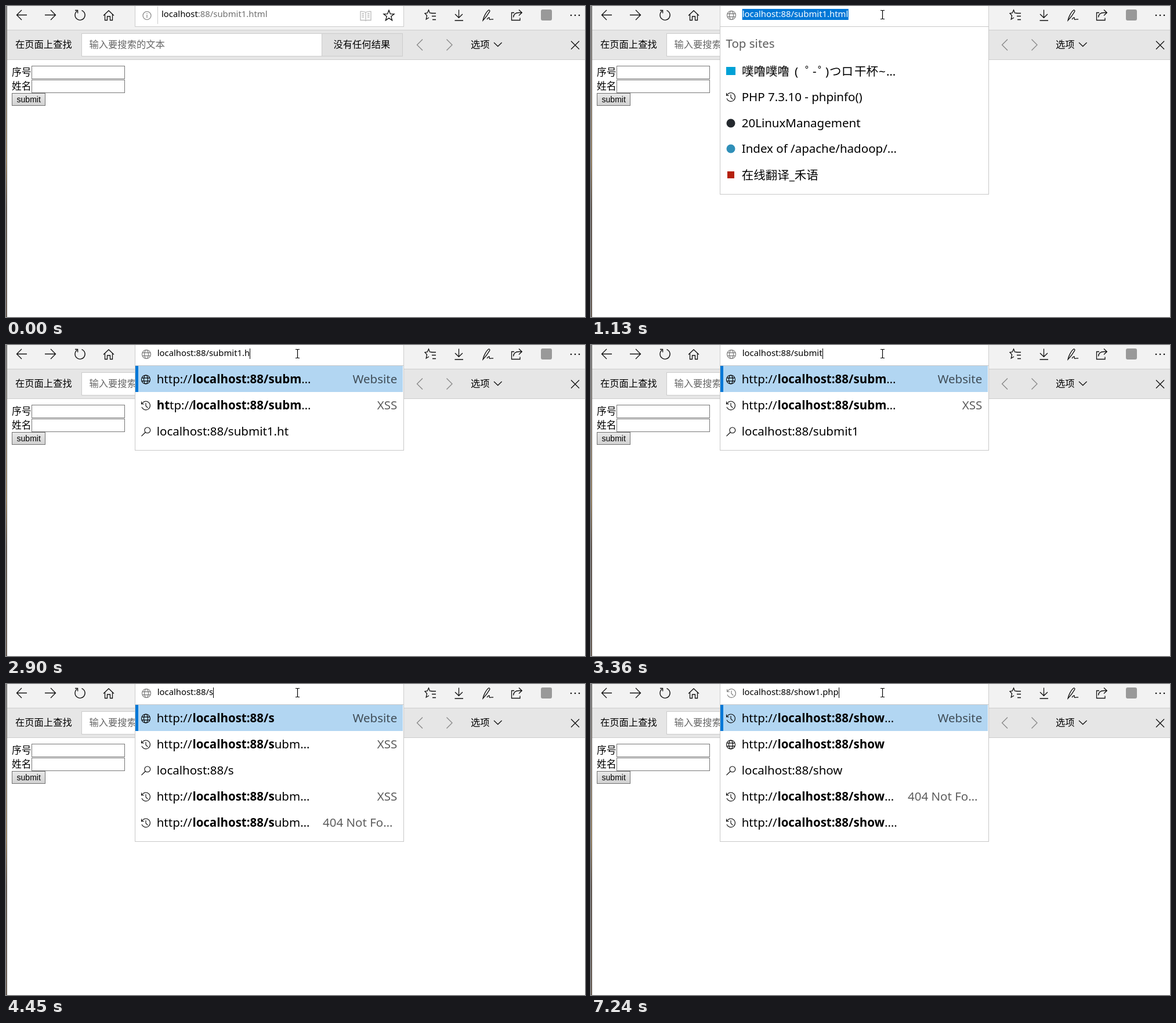
Write an HTML page that moves like this. It is 998 px wide and 536 px high and loops after 8 s.

```html
<!DOCTYPE html>
<html lang="zh-CN">
<head>
<meta charset="utf-8">
<title>Address bar</title>
<style>
html, body { margin: 0; width: 100%; height: 100%; overflow: hidden; background: #fff; }
svg { display: block; }
text { font: 16.3px "Noto Sans", "Noto Sans CJK SC", "Noto Sans CJK JP", sans-serif; white-space: pre; }
.url { font-size: 14.87px; }
.row { font-size: 20.5px; }
.bold { font-weight: 700; }
.page { font-size: 16.8px; }
.button { font: 14px "Liberation Sans", Arial, sans-serif; }
.line { fill: none; stroke: currentColor; stroke-width: 1.3; }
.thin { stroke-width: 1.1; }
</style>
</head>
<body>
<svg width="998" height="536" viewBox="0 0 998 536">
  <defs>
    <linearGradient id="edge" x1="0" y1="0" x2="0" y2="1">
      <stop offset="0" stop-color="#8a8a8a"/><stop offset=".25" stop-color="#a89a8c"/>
      <stop offset=".5" stop-color="#c09a62"/><stop offset=".65" stop-color="#5d4a3e"/>
      <stop offset="1" stop-color="#6f5a48"/>
    </linearGradient>
    <linearGradient id="face" x1="0" y1="0" x2="0" y2="1">
      <stop offset="0" stop-color="#e8e8e8"/><stop offset="1" stop-color="#d2d2d2"/>
    </linearGradient>
    <g id="globe" class="line thin">
      <circle r="7.5"/><ellipse rx="3.4" ry="7.5"/><path d="M-7 -2.6H7M-7 2.6H7"/>
    </g>
    <g id="clock" class="line thin">
      <path d="M-6.6 -3.4A7.4 7.4 0 1 1 -7 2.4M-7.4 -7V-2.8H-3.2M0 -4.6V.5L3.4 3.8"/>
    </g>
    <g id="search" class="line thin"><circle cx="2.8" cy="-2.6" r="4.9"/><path d="M-.8 1L-7.5 7.6"/></g>
    <path id="arrow" d="M.5 .5V16.5L4.2 13 6.7 18.5 9 17.5 6.6 12H11.6Z" fill="#fff" stroke="#000"/>
    <path id="beam" d="M-3.5 -7.5H-1L0 -6.5 1 -7.5H3.5M0 -6.5V6.5M-3.5 7.5H-1L0 6.5 1 7.5H3.5" fill="none" stroke="#000" stroke-width="1.2"/>
    <path id="star" d="M0 -9.2L2.4 -2.8 9 -2.6 3.8 1.6 5.6 8.2 0 4.4 -5.6 8.2 -3.8 1.6 -9 -2.6 -2.4 -2.8Z" class="line"/>
  </defs>

  <rect width="998" height="41" fill="#f2f2f2"/>
  <rect y="41" width="998" height="52" fill="#ccc"/>
  <rect y="42" width="998" height="50" fill="#e6e6e6"/>

  <g class="line" color="#111">
    <path d="M36 15.5H18.5M27 7L18.5 15.5 27 24"/>
    <path d="M67 15.5H85.5M77 7L85.5 15.5 77 24"/>
    <path d="M122.4 8.8A8.6 8.6 0 1 0 130.5 7.6M119 7.5H123.6V12.5"/>
    <path d="M168 16.5L177 8 186 16.5M170.5 14.5V24.5H174.5V18H179.5V24.5H183.5V14.5"/>
    <path d="M780.5 6.5V20M774 14L780.5 20.3 787 14M773.5 25H788"/>
    <path d="M822 25C823 19 828 10 831.5 7.2 833 6.4 834.6 8 833.6 9.6 830.5 15 826 21 822 25ZM829 23C832 19 834 19 833 22 833 25 836 22 840 23"/>
    <path d="M876 11.5H871.5V24.5H886V20.5M874.5 19.5C875 14 879 11.5 884 11.5H889M884 6.5L889.3 11.5 884 16.5"/>
    <path d="M974 74.5L988 60.5M974 60.5L988 74.5"/>
    <path d="M841 63L847.8 69.5 854.6 63"/>
    <path d="M733 12.5H741M734 17.5H741M735 23.5H741M735 12.5L730.5 12 728.5 7 726.3 12 722 12.6 725.5 16.5 724.2 23 729 20"/>
  </g>
  <g class="line" color="#888"><path d="M718 57.5L708.5 67 718 76.5M759.5 57.5L769 67 759.5 76.5"/></g>
  <rect x="922" y="6" width="19" height="19" rx="3" fill="#999"/>
  <g fill="#111"><circle cx="974" cy="16" r="1.3"/><circle cx="981" cy="16" r="1.3"/><circle cx="988" cy="16" r="1.3"/></g>

  <rect x="130.5" y="47.5" width="414" height="39" fill="#fff" stroke="#ccc"/>
  <rect x="544.5" y="47.5" width="139" height="39" fill="#e1e1e1" stroke="#ccc"/>
  <text x="16" y="72">在页面上查找</text>
  <text x="143.5" y="72" fill="#666">输入要搜索的文本</text>
  <text x="564.5" y="72">没有任何结果</text>
  <text x="801" y="71.5">选项</text>

  <text class="page" x="10" y="119.5">序号</text>
  <text class="page" x="10" y="143.5">姓名</text>
  <rect x="44.5" y="103.5" width="160" height="22" fill="#fff" stroke="#767676"/>
  <rect x="44.5" y="127.5" width="160" height="22" fill="#fff" stroke="#767676"/>
  <rect x="10.5" y="150.5" width="57" height="21" fill="url(#face)" stroke="#707070"/>
  <text class="button" x="39.2" y="166" text-anchor="middle">submit</text>

  <rect width="1" height="536" fill="url(#edge)"/>
  <rect x="1" width="1" height="536" fill="#686868"/>

  <g id="bar"></g>
  <g id="pointer"></g>
</svg>
<script>
const LOOP = 8000, HOST = 'localhost:88/', PAGE = 'submit1.html';
const LEFT = 259.7;
const bar = document.getElementById('bar'), pointer = document.getElementById('pointer');
const pen = document.createElement('canvas').getContext('2d');

// [start, path, selected characters at the end, view, caret hidden]
// view: idle, focus, top, or the query the suggestions belong to
const steps = [
  [0, PAGE, 0, 'idle'],
  [980, PAGE, 25, 'focus'],
  [1060, PAGE, 25, 'top'],
  [1210, PAGE, 0, 'top'],
  [2210, 'submit1.htm', 0, 'top'],
  [2290, 'submit1.htm', 0, 'submit1.htm'],
  [2590, 'submit1.ht', 0, 'submit1.htm'],
  [2670, 'submit1.ht', 0, 'submit1.ht'],
  [2900, 'submit1.h', 0, 'submit1.ht'],
  [2980, 'submit1.h', 0, 'submit1.h'],
  [3210, 'submit1.', 0, 'submit1.h'],
  [3290, 'submit1', 0, 'submit1.'],
  [3360, 'submit', 0, 'submit1'],
  [3440, 'submit', 0, 'submit'],
  [3590, 'submi', 0, 'submit'],
  [3660, 'submi', 0, 'submi'],
  [3740, 'subm', 0, 'submi'],
  [3810, 'subm', 0, 'subm'],
  [3890, 'sub', 0, 'subm'],
  [3970, 'sub', 0, 'sub'],
  [4120, 'su', 0, 'sub'],
  [4210, 'su', 0, 'su'],
  [4360, 's', 0, 'su'],
  [4450, 's', 0, 's'],
  [5140, 'sh', 0, 's'],
  [5230, 'show1.php', 7, 'sh'],
  [5380, 'show1.php', 6, 'sh'],
  [5460, 'show1.php', 6, 'sho'],
  [5610, 'show1.php', 5, 'sho'],
  [5690, 'show1.php', 5, 'show'],
  [7160, 'show1.php', 0, 'show', true],
  [7240, 'show1.php', 0, 'show']
];

// Pointer stops, one every 76 ms from 70 ms on
const path = [[882, 508], [868, 452], [820, 360], [745, 262], [662, 180], [590, 120],
  [530, 76], [488, 46], [471, 28], [486, 18], [503, 15]];

const use = (id, x, y, color = '#000') => `<use href="#${id}" x="${x}" y="${y}" color="${color}"/>`;
const text = (x, y, body, cls = 'row', more = '') => `<text class="${cls}" x="${x}" y="${y}" ${more}>${body}</text>`;
const box = (x, y, w, h, more) => `<rect x="${x}" y="${y}" width="${w}" height="${h}" ${more}/>`;
const bold = s => `<tspan class="bold">${s}</tspan>`;

function urlWidth(s) {
  pen.font = '14.87px "Noto Sans", sans-serif';
  return pen.measureText(s).width;
}

function label(s, y) {
  const short = s.endsWith('…');
  return text(short ? 546 : 674.3, y, s, 'row', `opacity=".64" text-anchor="${short ? 'start' : 'end'}"`);
}

function link(icon, strong, rest = '', note = '', hit = '') {
  return (y) => use(icon, 241, y + 1)
    + text(LEFT, y + 7.5, bold(hit) + 'http://'.slice(hit.length))
    + text(321.4, y + 7.5, bold(HOST + strong) + rest)
    + (note && label(note, y + 7.5));
}

function suggestions(q) {
  const stem = q.slice(0, 4);
  const find = y => use('search', 241, y + 1) + text(LEFT, y + 7.5, HOST + q);
  if (q.startsWith('sh')) {
    const rest = 'show'.slice(stem.length);
    return [link('clock', stem, rest + '…', 'Website'), link('globe', stem), find,
      link('clock', stem, rest + '…', '404 Not Fo…'), link('clock', stem, rest + '.…')];
  }
  const rest = 'subm'.slice(stem.length) + '…';
  const hit = (q.match(/\.(ht?)$/) || ['', ''])[1];
  const rows = [link('globe', stem, q.length > 4 ? '…' : '', 'Website'),
    link('clock', stem, rest, 'XSS', hit), find];
  if (q.length < 7) rows.push(link('clock', stem, rest, 'XSS'), link('clock', stem, rest, '404 Not Fo…'));
  return rows;
}

function panel(bottom) {
  return box(222.5, 35.5, 463, bottom - 35.5, 'fill="#fff" stroke="#c8c8c8"');
}

function topSites() {
  const cheer = [[260, '噗噜噗噜'], [351, '('], [369, '゜'], [382, '-'], [391, '゜'], [404, ')'],
    [411, 'つロ'], [454, '干杯'], [496, '~'], [509, '…']];
  const dot = (y, c) => `<circle cx="241" cy="${y}" r="7.5" fill="${c}"/>`;
  return panel(324.5) + text(232.5, 72, 'Top sites', 'row', 'fill="#5c5c5c"')
    + box(233, 105, 16, 14, 'fill="#00a1d6"') + cheer.map(([x, s]) => text(x, 119.5, s)).join('')
    + use('clock', 241, 157) + text(LEFT, 164, 'PHP 7.3.10 - phpinfo()')
    + dot(202, '#24292e') + text(LEFT, 209, '20LinuxManagement')
    + dot(246, '#2f8fb8') + text(LEFT, 253, 'Index of /apache/hadoop/…')
    + box(235, 285, 12, 12, 'fill="#b5200d"') + text(LEFT, 298.5, '在线翻译_禾语');
}

function dropdown(q) {
  const rows = suggestions(q);
  return panel(46.5 + 45 * rows.length)
    + box(223, 36, 461, 45, 'fill="#b2d6f2"') + box(223, 36, 5, 45, 'fill="#0078d7"')
    + rows.map((row, i) => row(58.5 + 45 * i)).join('');
}

function drawBar([, file, count, view, noCaret]) {
  const frame = box(222.5, -1.5, 463, 37, 'fill="#fff" stroke="#ccc"');
  if (view === 'idle') {
    return frame + '<g class="line thin" color="#777"><circle cx="243" cy="16.5" r="7"/><path d="M243 15V20.5M243 12V13.6"/></g>'
      + box(261, 1, 1, 30, 'fill="#ccc"')
      + text(268, 19, `localhost<tspan fill="#707070">:88/${file}</tspan>`, 'url')
      + '<path class="line" color="#bbb" d="M620 11V25.5M620 11C617 9 614 9.5 611 9.5V24.5H618L620 25.5 622 24.5H629V9.5C626 9.5 623 9 620 11M613.5 13H617M613.5 16H617M613.5 19H617M623 13H626.5M623 16H626.5M623 19H626.5"/>'
      + use('star', 660, 16.5);
  }
  const full = HOST + file, kept = full.slice(0, full.length - count), tail = full.slice(kept.length);
  const start = 260.7, x = start + urlWidth(kept);
  const icon = view.startsWith('sh') ? 'clock' : 'globe';
  let out = frame + use(icon, 242, 16, '#767676');
  if (count) out += box(x, 5, urlWidth(tail) + .5, 19, 'fill="#0078d7"');
  else if (!noCaret) out += box(Math.round(x), 6, 1, 18, 'fill="#000"');
  out += text(start, 18.5, `${kept}<tspan fill="#fff">${tail}</tspan>`, 'url');
  if (view === 'top') out += topSites();
  else if (view !== 'focus') out += dropdown(view);
  return out;
}

function drawPointer(t) {
  if (t < 70) return '';
  const [x, y] = path[Math.min(path.length - 1, Math.floor((t - 70) / 76))];
  const typing = y < 36 || (y > 47 && y < 87 && x < 545);
  return use(typing ? 'beam' : 'arrow', t < 980 ? x : 502.5, y);
}

function put(node, html) {
  if (node.last !== html) node.innerHTML = node.last = html;
}

let shown;
function tick() {
  const t = performance.now() % LOOP;
  const step = steps.findLast(s => s[0] <= t);
  if (step !== shown) put(bar, drawBar(shown = step));
  put(pointer, drawPointer(t));
  requestAnimationFrame(tick);
}
tick();
</script>
</body>
</html>
```
